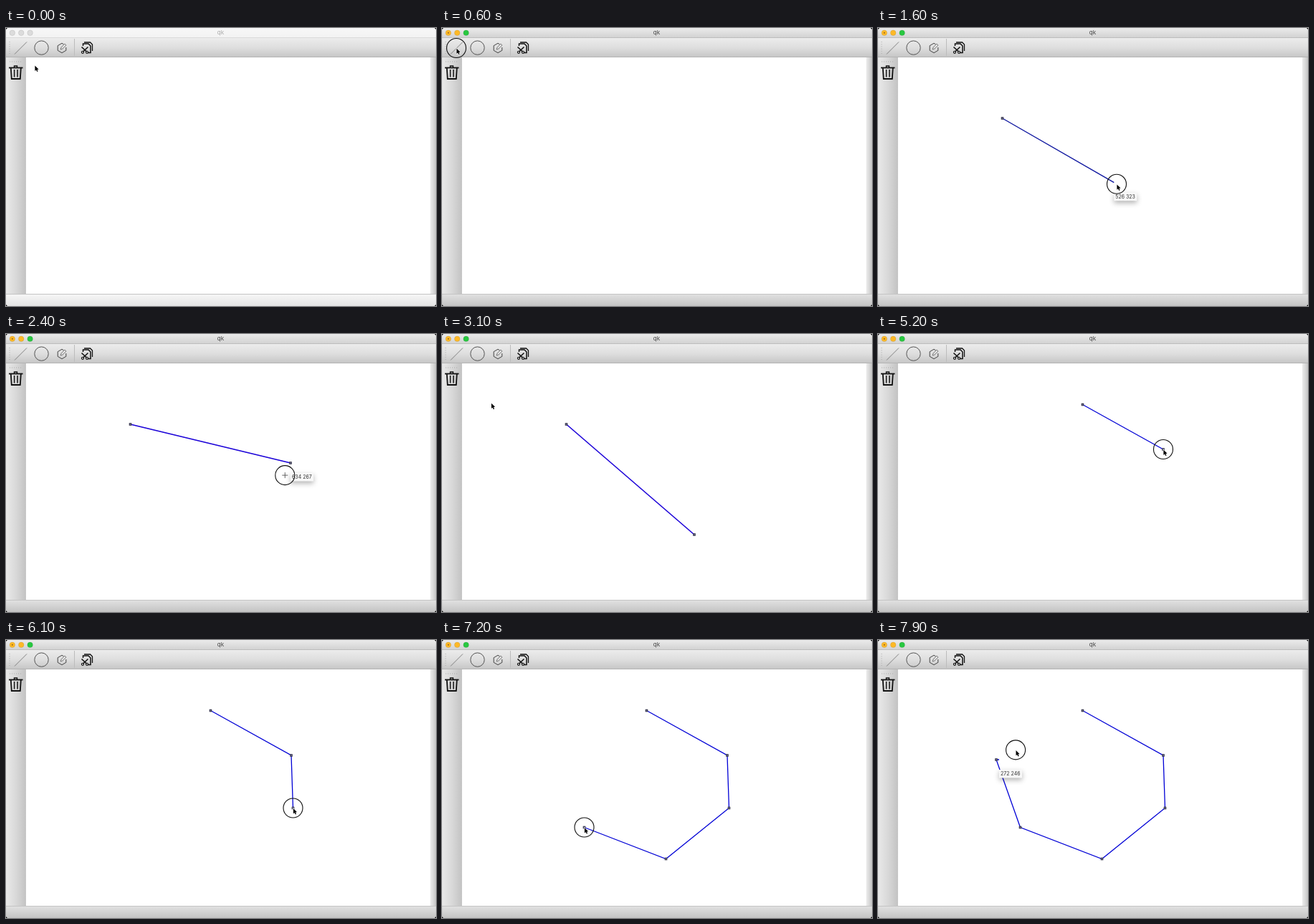
Recreate the animation shown at these times as an HTML page with a canvas. Size 600 by 388 pixels, loop 8 s.

```html
<!DOCTYPE html>
<html>
<head>
<meta charset="utf-8">
<style>
html, body { margin: 0; width: 100%; height: 100%; overflow: hidden; background: #000; }
canvas { display: block; }
</style>
</head>
<body>
<canvas id="stage" width="600" height="388"></canvas>
<script>
const ctx = document.getElementById('stage').getContext('2d');
const LOOP = 8000, STEP = 100;
const LINE_TOOL = { x: 20, y: 28 }, POLYGON_TOOL = { x: 78, y: 28 }, TRASH = { x: 16, y: 62 };

// Each stop lasts from `at` to `leave`; the button is down on a click and along a drag.
const stop = (at, { x, y }, hold = 0, action = '') => ({ at, leave: at + hold, x, y, action });
const click = (at, place) => stop(at, place, 200, 'click');
const drag = (at, x, y, hold) => stop(at, { x, y }, hold, 'drag');
const corner = (at, x, y) => drag(at, x, y, STEP);

const lineStart = stop(1200, { x: 173.5, y: 126 }, 0, 'click');
const lineEnd = drag(1530, 333, 217.8, 370);
const linePull = drag(2300, 397, 180);
const lineDrop = drag(2680, 352, 280, 120);
const trashClick = click(3200, TRASH);
const firstCorner = stop(4300, { x: 285.5, y: 98.5 }, STEP, 'click');
const corners = [
  firstCorner,
  corner(5200, 398, 161),
  corner(6000, 400.5, 234.5),
  corner(6600, 312.5, 305.5),
  corner(7100, 198.5, 261.5),
  corner(7600, 165, 167)
];
const stops = [
  stop(0, { x: 40, y: 52 }),
  stop(400, LINE_TOOL, 400, 'click'),
  lineStart, lineEnd, linePull, lineDrop, trashClick,
  click(3600, POLYGON_TOOL),
  stop(4100, { x: 284, y: 95 }),
  ...corners,
  drag(7800, 169, 167),
  drag(8150, firstCorner.x, firstCorner.y)
];

const within = (t, a, b) => t >= a && t < b;
const smooth = k => k * k * (3 - 2 * k);

function pointer(t) {
  const next = stops.findIndex(s => s.at > t);
  const a = stops[next - 1], b = stops[next];
  const moving = t >= a.leave;
  const k = moving ? smooth((t - a.leave) / (b.at - a.leave)) : 0;
  return {
    x: a.x + (b.x - a.x) * k,
    y: a.y + (b.y - a.y) * k,
    down: moving ? b.action === 'drag' : a.action !== ''
  };
}

function rect(x, y, w, h, color) {
  ctx.fillStyle = color;
  ctx.fillRect(x, y, w, h);
}

function gradient(x, y, w, h, colors, horizontal) {
  const g = ctx.createLinearGradient(x, y, horizontal ? x + w : x, horizontal ? y : y + h);
  colors.forEach((c, i) => g.addColorStop(i / (colors.length - 1), c));
  rect(x, y, w, h, g);
}

function stroke(points, color, width = 1) {
  ctx.beginPath();
  points.forEach(p => ctx.lineTo(p.x, p.y));
  ctx.strokeStyle = color;
  ctx.lineWidth = width;
  ctx.stroke();
}

function segment(x1, y1, x2, y2, color, width) {
  stroke([{ x: x1, y: y1 }, { x: x2, y: y2 }], color, width);
}

function circle(x, y, r, fill, line, width = 1) {
  ctx.beginPath();
  ctx.arc(x, y, r, 0, Math.PI * 2);
  if (fill) { ctx.fillStyle = fill; ctx.fill(); }
  if (line) { ctx.strokeStyle = line; ctx.lineWidth = width; ctx.stroke(); }
}

function outline(path, color, width) {
  ctx.strokeStyle = color;
  ctx.lineWidth = width;
  ctx.stroke(new Path2D(path));
}

function text(str, x, y, size, color, align) {
  ctx.font = `${size}px Inter, sans-serif`;
  ctx.textAlign = align;
  ctx.textBaseline = 'middle';
  ctx.fillStyle = color;
  ctx.fillText(str, x, y);
}

function drawGrips() {
  for (let i = 0; i < 6; i++) {
    rect(4.5, 19 + i * 3.2, 1, 1, '#aaa');
    rect(5 + i * 3, 46.5, 1, 1, '#aaa');
  }
}

function drawPolygonIcon() {
  const { x, y } = POLYGON_TOOL;
  const sides = Array.from({ length: 5 }, (_, i) => {
    const a = (30 + i * 60) * Math.PI / 180;
    return { x: x + 6.7 * Math.cos(a), y: y + 6.7 * Math.sin(a) };
  });
  stroke([{ x: sides[0].x, y: y - 1 }, ...sides, { x: x + 2.5, y: y - 5.2 }], '#444', 1);
  outline(`M${x - 2} ${y + 2}l1 -3l5 -5l2 2l-5 5z`, '#777', 0.9);
}

function drawCutIcon() {
  outline('M109 20h8.5l3 3v9', '#111', 1.3);
  outline('M107.5 25v-3h7.5l3 3v9.5h-4', '#111', 1.5);
  for (const side of [-1, 1]) {
    segment(110 + side * 4.5, 26.5, 110 - side * 2.5, 33, '#111', 1.6);
    circle(110 + side * 3, 33.8, 1.6, null, '#111', 1.1);
  }
}

function drawTrashIcon() {
  segment(4, 55.5, 23.5, 55.5, '#111', 1.8);
  outline('M11.5 55v-2h4v2', '#111', 1.4);
  outline('M6.8 56l1 15h12l1 -15', '#111', 1.8);
  for (const x of [11.6, 16]) segment(x, 58, x, 68.5, '#111', 1.5);
}

function drawIcons() {
  drawGrips();
  segment(12, 36.5, 29, 19.5, '#777', 0.9);
  circle(49.5, 27.6, 9.7, null, '#444', 0.9);
  drawPolygonIcon();
  segment(95.5, 15, 95.5, 39, '#bcbcbc');
  drawCutIcon();
  drawTrashIcon();
}

function drawLights(active) {
  const colors = active ? ['#fdb927', '#fdb927', '#28c840'] : Array(3).fill('#dcdcdc');
  colors.forEach((c, i) => circle(8.8 + i * 12.4, 6.8, 3.8, c, 'rgba(0,0,0,.15)', 0.6));
  if (active) circle(8.8, 6.8, 1, '#94631a');
}

function drawWindow(active) {
  rect(0, 0, 600, 388, '#000');
  ctx.save();
  ctx.beginPath();
  ctx.roundRect(0, 0, 600, 388, 4);
  ctx.clip();
  rect(0, 0, 600, 388, '#fff');
  gradient(0, 0, 600, 13, active ? ['#ebebeb', '#d3d3d3'] : ['#f7f7f7', '#f3f3f3']);
  rect(0, 13, 600, 1, active ? '#bdbdbd' : '#dadada');
  gradient(0, 14, 600, 27, ['#ececec', '#dedede', '#c5c5c5']);
  rect(0, 40, 600, 1, '#b4b4b4');
  gradient(0, 41, 27, 330, ['#e9e9e9', '#d9d9d9', '#c4c4c4'], true);
  rect(27, 41, 1, 330, '#c8c8c8');
  gradient(592, 41, 8, 330, ['#ececec', '#dadada', '#c4c4c4'], true);
  gradient(0, 371, 600, 17, active ? ['#e2e2e2', '#c3c3c3'] : ['#f7f7f7', '#e4e4e4']);
  rect(0, 371, 600, 1, '#c4c4c4');
  ctx.restore();
  drawLights(active);
  text('qk', 299.5, 7, 8, active ? '#444' : '#aaa', 'center');
  drawIcons();
}

function handle({ x, y }) {
  rect(x - 1.8, y - 1.8, 3.6, 3.6, '#33334a');
  rect(x - 0.7, y - 0.7, 1.4, 1.4, '#8888a8');
}

function tooltip({ x, y }) {
  ctx.save();
  ctx.shadowColor = 'rgba(0,0,0,.3)';
  ctx.shadowBlur = 7;
  ctx.shadowOffsetY = 3;
  rect(x, y + 14, 32, 11.5, '#f8f8f8');
  ctx.restore();
  const sceneX = Math.round(526 + (x - 329) * 1.588);
  const sceneY = Math.round(324 + (y - 216) * 1.588);
  text(`${sceneX} ${sceneY}`, x + 2, y + 20, 7, '#333', 'left');
}

// The shape being drawn trails the pointer by one step.
function drawLine(t) {
  const end = pointer(Math.min(t - STEP, lineDrop.leave));
  const done = t >= lineEnd.leave;
  stroke([lineStart, end], done ? '#1a00d8' : '#0a129e', done ? 1.6 : 1.3);
  handle(lineStart);
  if (done) handle(end);
  if (pointer(t).down && t < lineDrop.leave) tooltip(end);
}

function drawPolygon(t) {
  const placed = corners.filter(c => c.at <= t);
  const dragging = t > placed[placed.length - 1].leave;
  const end = pointer(t - STEP);
  stroke(dragging ? [...placed, end] : placed, '#0000d6', 1.3);
  placed.forEach(handle);
  if (dragging) tooltip(end);
}

function drawPointer(t) {
  const { x, y, down } = pointer(t);
  if (down) circle(x, y, 13.5, null, '#111', 1.1);
  if (within(t, lineEnd.leave, lineDrop.leave)) {
    segment(x - 4, y, x + 4, y, '#555', 0.9);
    segment(x, y - 4, x, y + 4, '#555', 0.9);
    return;
  }
  ctx.save();
  ctx.translate(x + 0.4, y + 0.6);
  ctx.scale(0.85, 0.85);
  const arrow = 'M0 0v8.6l2 -1.7l1.4 3.1l1.5 -.7l-1.3 -3l2.5 -.2z';
  outline(arrow, '#fff', 1.4);
  ctx.fillStyle = '#000';
  ctx.fill(new Path2D(arrow));
  ctx.restore();
}

function frame(now) {
  const t = Math.floor((now % LOOP) / STEP) * STEP;
  drawWindow(t >= 600);
  if (within(t, lineStart.at + STEP, trashClick.leave)) drawLine(t);
  if (t >= firstCorner.at) drawPolygon(t);
  drawPointer(t);
}

const began = performance.now();
function tick() {
  frame(performance.now() - began);
  requestAnimationFrame(tick);
}
tick();
</script>
</body>
</html>
```
